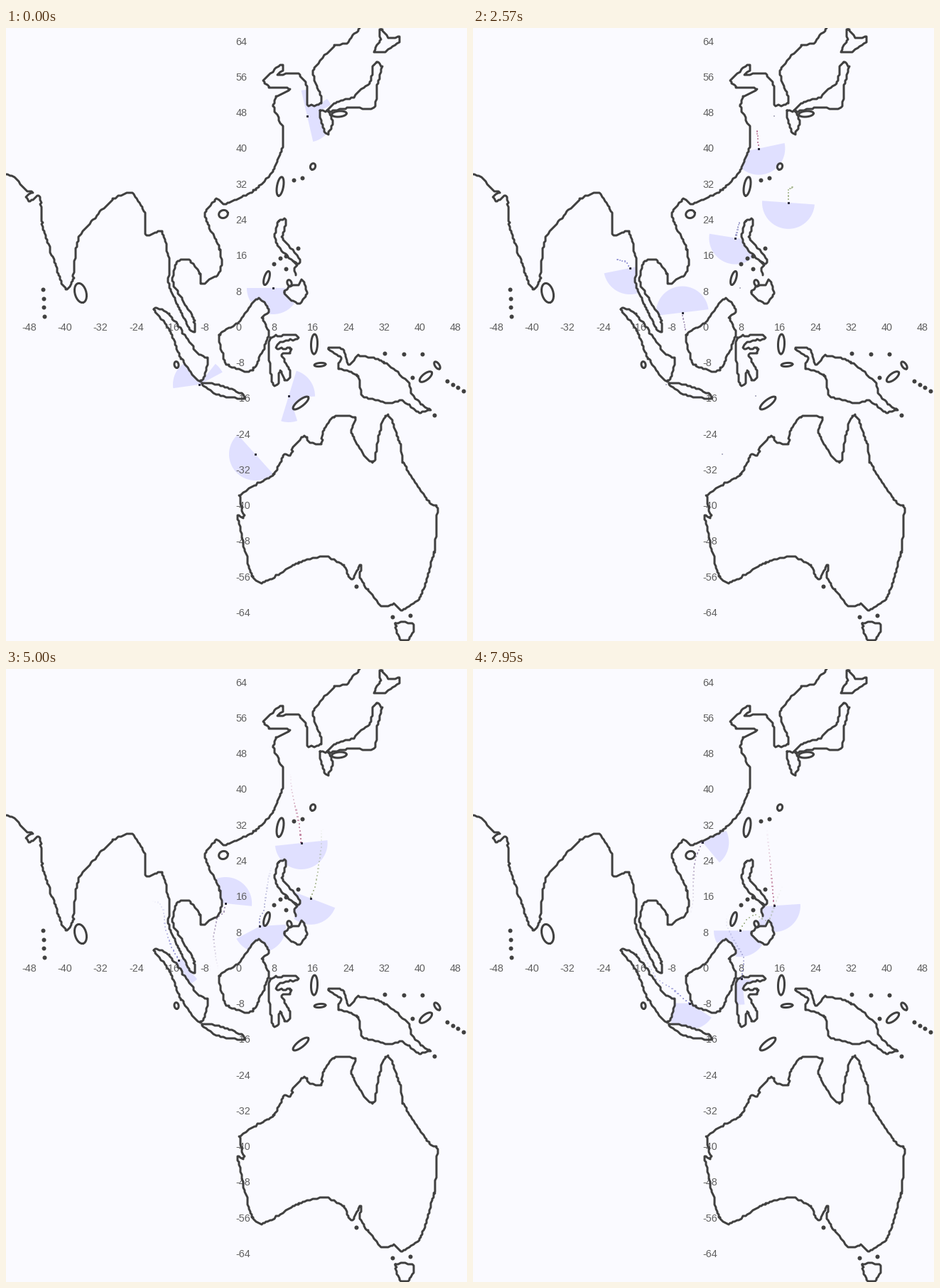
Write a matplotlib script that moves like this. It is 649x863 px and loops after 8 s.

```python
import numpy as np
import matplotlib.pyplot as plt
from matplotlib.animation import FuncAnimation
from matplotlib.collections import LineCollection, PolyCollection
from matplotlib.colors import to_rgb

W, H, DPI = 649, 863, 64
PX = 72 / DPI                 # points per pixel
STEP, LOOP = 40, 8000
RESTART, FADE, DOT_GAP, EASE_IN = 1450, 3300, 160, 540
RADIUS, LOOKAHEAD, GRID = 37, 8, 2
INK = "#404040"

rng = np.random.default_rng(4)
coasts, islets = [], []


def coast(*xy, closed=False):
    """Soft curve through key points, roughened and snapped to a coarse grid."""
    p = np.array(xy, float).reshape(-1, 2)
    ext = np.vstack([p[-1], p, p[:2]]) if closed else np.vstack([p[0], p, p[-1]])
    parts = []
    for a, b, c, d in zip(ext, ext[1:], ext[2:], ext[3:]):
        size = np.hypot(*(c - b))
        m0 = 0.5 * size * (c - a) / max(np.hypot(*(c - a)), 1)
        m1 = 0.5 * size * (d - b) / max(np.hypot(*(d - b)), 1)
        u = np.linspace(0, 1, int(size / 3) + 2)[:-1, None]
        parts.append((2*u**3 - 3*u**2 + 1) * b + (u**3 - 2*u**2 + u) * m0
                     + (3*u**2 - 2*u**3) * c + (u**3 - u**2) * m1)
    line = np.vstack(parts + [p[:1] if closed else p[-1:]])
    line[1:-1] += rng.uniform(-0.6, 0.6, line[1:-1].shape)
    coasts.append(np.round(line / GRID) * GRID)


def island(*xy):
    coast(*xy, closed=True)


def oval(x, y, length, width, tilt):
    a, t = np.linspace(0, 2 * np.pi, 25), np.radians(tilt)
    u, v = length / 2 * np.cos(a), width / 2 * np.sin(a)
    coasts.append(np.column_stack([x + u * np.cos(t) - v * np.sin(t),
                                   y + u * np.sin(t) + v * np.cos(t)]))


def chain(x0, y0, x1, y1, n):
    islets.extend(np.linspace((x0, y0), (x1, y1), n))


# Asian mainland, west to east
coast(0, 206, 13, 211, 29, 229, 37, 231, 28, 237, 34, 244, 47, 236, 52, 281, 74, 346,
      84, 368, 94, 356, 102, 296, 152, 240, 177, 232, 196, 262, 198, 292, 219, 286,
      230, 330, 229, 362, 246, 398, 258, 424, 265, 428, 265, 412, 235, 357, 242, 328,
      258, 327, 274, 347, 275, 361, 301, 344, 302, 315, 281, 268, 281, 258, 297, 241,
      306, 248, 349, 229, 374, 204, 389, 170, 390, 143, 376, 110)
coast(376, 110, 381, 96, 399, 86, 371, 84, 363, 74, 389, 51, 391, 58, 383, 66, 398, 64,
      412, 64, 424, 82, 425, 108, 442, 107, 444, 97, 432, 62, 463, 25, 478, 22, 498, 0)

# Japan, Taiwan, Hainan
island(527, 2, 539, 14, 553, 13, 554, 19, 532, 34, 519, 33, 527, 18)
island(522, 48, 529, 55, 523, 82, 517, 113, 488, 112, 453, 117, 464, 105, 488, 98,
       497, 88, 513, 76, 517, 55)
island(442, 117, 454, 118, 460, 133, 453, 149, 449, 147)
oval(469, 121, 21, 8, -5)
oval(432, 195, 9, 7, 110)
oval(386, 223, 27, 9, 100)
oval(306, 262, 13, 11, -20)
chain(405, 214, 417, 211, 2)

# Philippines
island(384, 271, 395, 270, 389, 296, 414, 331, 381, 305, 379, 293)
coast(404, 328, 409, 334, 406, 340, 409, 349)
island(391, 373, 405, 361, 411, 363, 417, 354, 424, 373, 412, 388)
oval(367, 352, 20, 7, 107)
oval(399, 359, 9, 6, 70)
chain(411, 310, 377, 332, 3)
chain(386, 324, 394, 339, 2)

# Indian Ocean, Sunda islands
oval(105, 373, 28, 16, 75)
oval(240, 474, 9, 6, 80)
chain(52, 368, 54, 406, 4)
island(209, 395, 228, 401, 270, 458, 284, 466, 274, 497, 248, 467, 230, 424)
island(276, 501, 296, 502, 333, 515, 336, 522, 300, 517)
island(300, 433, 326, 416, 355, 380, 371, 399, 361, 407, 370, 430, 346, 482, 311, 474)

# Sulawesi, Moluccas, Timor
island(372, 437, 380, 433, 412, 435, 385, 442, 380, 451, 401, 451, 400, 457, 388, 459,
       399, 480, 398, 494, 392, 496, 386, 481, 383, 501, 376, 502, 370, 465)
oval(434, 445, 28, 9, 92)
oval(442, 474, 16, 5, -5)
oval(415, 528, 27, 9, -38)

# New Guinea and neighbours
island(454, 451, 474, 452, 483, 474, 496, 461, 530, 469, 568, 500, 571, 515, 590, 534,
       598, 537, 582, 541, 557, 524, 540, 529, 501, 517, 495, 489, 467, 478, 472, 464)
oval(591, 491, 21, 9, -38)
oval(607, 475, 12, 6, 55)
chain(533, 458, 586, 459, 3)
chain(621, 497, 644, 511, 4)
chain(572, 492, 603, 545, 2)

# Australia and Tasmania
island(462, 547, 491, 549, 486, 570, 515, 611, 525, 573, 537, 545, 555, 586, 559, 612,
       597, 669, 607, 674, 603, 737, 584, 800, 558, 820, 546, 811, 530, 814, 511, 793,
       498, 772, 500, 756, 486, 776, 476, 757, 449, 744, 414, 752, 361, 781, 347, 773,
       326, 686, 335, 690, 330, 657, 378, 628, 392, 600, 400, 603, 404, 591, 420, 574,
       427, 584, 443, 585, 446, 568)
island(549, 838, 573, 838, 574, 848, 566, 861, 556, 861)
chain(544, 829, 569, 827, 2)
chain(493, 786, 493, 786, 1)

seg_a = np.vstack([c[:-1] for c in coasts])
seg_b = np.vstack([c[1:] for c in coasts])

# Vessels before the restart: x, y, heading, time of leaving
parked = [(424, 124, -13, RESTART), (376, 366, 90, RESTART), (272, 502, -98, RESTART),
          (351, 600, 138, RESTART), (398, 518, 17, RESTART + STEP)]


class Voyage:
    """A route sailed at constant speed (px/ms) after a gentle start."""

    def __init__(self, start, color, speed, *route):
        self.start, self.rgb, self.speed = start, to_rgb(color), speed
        self.route = np.array(route, float)
        legs = np.hypot(*np.diff(self.route, axis=0).T)
        self.miles = np.concatenate([[0], np.cumsum(legs)])

    def at(self, t, ahead=0):
        d = np.maximum(t - self.start, 0)
        s = self.speed * d * d / (d + EASE_IN) + ahead
        return np.column_stack([np.interp(s, self.miles, c) for c in self.route.T])

    def pose(self, t):
        (x, y), = self.at(t)
        (fx, fy), = self.at(t, LOOKAHEAD)
        return x, y, np.degrees(np.arctan2(fy - y, fx - x))


voyages = [
    Voyage(RESTART, "#a03c68", 0.0328, (400, 145), (402, 168), (413, 220), (418, 267),
           (424, 334), (425, 350)),
    Voyage(RESTART, "#7c9458", 0.0338, (450, 224), (444, 227), (444, 250), (436, 304),
           (419, 348), (416, 357), (397, 345), (387, 351), (376, 367), (376, 390)),
    Voyage(RESTART, "#7474b4", 0.0295, (375, 274), (369, 297), (363, 340), (357, 350),
           (357, 362), (366, 379), (381, 405), (381, 415), (374, 460)),
    Voyage(RESTART + STEP, "#6868c4", 0.0328, (203, 326), (216, 329), (222, 340),
           (224, 365), (233, 392), (255, 430), (257, 436), (279, 449), (305, 471),
           (304, 486)),
    Voyage(RESTART, "#7c6494", 0.0328, (299, 425), (295, 403), (292, 378), (297, 350),
           (307, 343), (310, 325), (310, 309), (311, 277), (315, 262), (322, 245),
           (340, 230)),
]


def clock(t):
    """Voyage time; everything stalls briefly late in the loop."""
    return t - np.clip(t - 7180, 0, 190)


def sweep(x, y, heading):
    """Half disc ahead of a vessel, cut off where land blocks the view."""
    pos = np.array([x, y])
    lo, hi = np.minimum(seg_a, seg_b), np.maximum(seg_a, seg_b)
    near = np.all((lo < pos + RADIUS) & (hi > pos - RADIUS), axis=1)
    a = np.radians(heading + np.linspace(-90, 90, 91))
    d = np.column_stack([np.cos(a), np.sin(a)])
    reach = np.full(len(a), float(RADIUS))
    if near.any():
        p, e = seg_a[near] - pos, (seg_b - seg_a)[near]
        cross = d[:, :1] * e[:, 1] - d[:, 1:] * e[:, 0]
        cross[np.abs(cross) < 1e-9] = 1e-9
        dist = (p[:, 0] * e[:, 1] - p[:, 1] * e[:, 0]) / cross
        along = (p[:, 0] * d[:, 1:] - p[:, 1] * d[:, :1]) / cross
        hit = (dist > 0) & (along >= 0) & (along <= 1)
        reach = np.minimum(reach, np.where(hit, dist, RADIUS).min(axis=1))
    return np.vstack([pos, pos + d * reach[:, None]])


fig = plt.figure(figsize=(W / DPI, H / DPI), dpi=DPI, facecolor="#fafaff")
ax = fig.add_axes([0, 0, 1, 1])
ax.set(xlim=(0, W), ylim=(H, 0))
ax.axis("off")

fans = ax.add_collection(PolyCollection([], facecolor=(0.05, 0.05, 1, 0.105),
                                        edgecolor="none", zorder=1))
style = dict(color="#606060", family="Liberation Sans", size=14.4 * PX, ha="left",
             va="center_baseline", zorder=2)
for v in range(-64, 65, 8):
    ax.text(323.5, 420.3 - v * 6.285, str(v), **style)
    if v and abs(v) <= 48:
        ax.text(323.5 + v * 6.27, 420.3, str(v), **style)

ax.add_collection(LineCollection(coasts, colors=INK, linewidths=3 * PX,
                                 capstyle="round", joinstyle="round", zorder=3))
ax.scatter(*np.transpose(islets), s=(6 * PX) ** 2, c=INK, linewidths=0, zorder=3)
trail = ax.scatter([], [], s=(2.2 * PX) ** 2, marker="s", linewidths=0, zorder=4)
heads = ax.scatter([], [], s=(3 * PX) ** 2, marker="s", c="#303040", linewidths=0, zorder=5)


def update(i):
    t = STEP * i + 10
    now = clock(t)
    poses = [(x, y, h) for x, y, h, end in parked if t < end]
    poses += [v.pose(now) for v in voyages if t >= v.start]

    # Each mark left behind: position, colour, time it was made
    marks = [((x, y), (0.35, 0.35, 0.5), end) for x, y, _, end in parked]
    for v in voyages:
        times = np.arange(v.start, now, DOT_GAP)
        marks += [(p, v.rgb, s) for p, s in zip(v.at(times), times)]
    marks = [m for m in marks if 0 <= now - m[2] < FADE]

    fans.set_verts([sweep(*p) for p in poses])
    heads.set_offsets([p[:2] for p in poses])
    trail.set_offsets(np.reshape([p for p, _, _ in marks], (-1, 2)))
    trail.set_facecolor([(*rgb, 0.65 * (1 - (now - s) / FADE)) for _, rgb, s in marks]
                        or "none")
    return fans, trail, heads


anim = FuncAnimation(fig, update, frames=LOOP // STEP, interval=STEP, repeat=True,
                     repeat_delay=0, blit=False)
plt.show()
```
